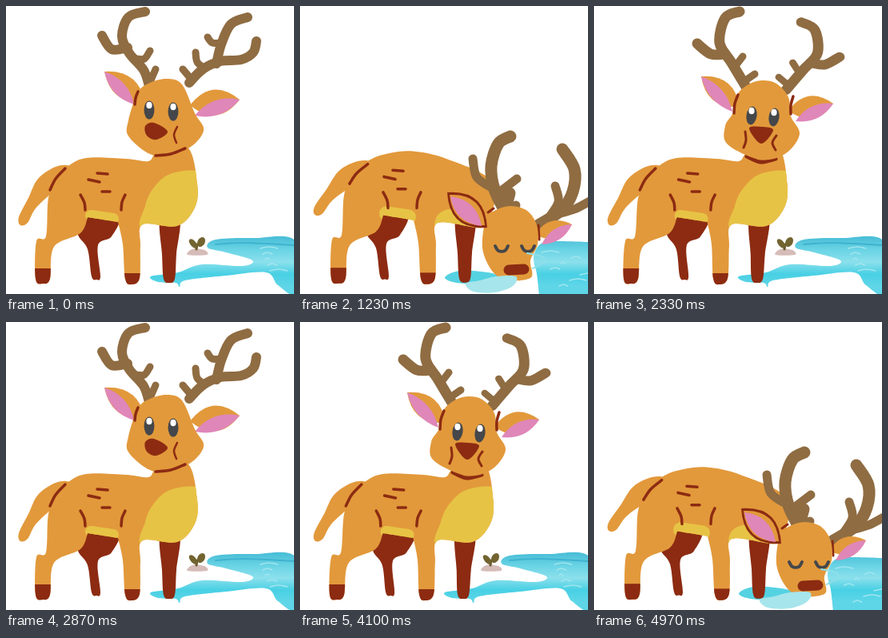
Write an HTML page with a canvas that moves like this. It is 360 px wide and 360 px high and loops after 5070 ms.

```html
<!DOCTYPE html>
<html lang="en">
<head>
<meta charset="utf-8">
<title>Drinking deer</title>
<style>
html, body { margin: 0; width: 100%; height: 100%; overflow: hidden; background: #fff; }
canvas { display: block; width: 360px; height: 360px; }
</style>
</head>
<body>
<canvas id="stage" width="360" height="360"></canvas>
<script>
const ctx = document.getElementById('stage').getContext('2d');
const COAT = '#e2993b', DARK = '#8c2b12', YELLOW = '#e7c345', PINK = '#df87b9',
      HORN = '#8f6c42', EYE = '#45474a';

// Smooth curve through "x,y x,y ..." points; a doubled point makes a corner.
function curve(text, open) {
  const pts = text.split(' ').map(p => p.split(',').map(Number)), n = pts.length;
  const at = i => open ? pts[Math.max(0, Math.min(n - 1, i))] : pts[(i + n) % n];
  const path = new Path2D();
  path.moveTo(...pts[0]);
  for (let i = 0; i < (open ? n - 1 : n); i++) {
    const [a, b, c, d] = [at(i - 1), at(i), at(i + 1), at(i + 2)];
    path.bezierCurveTo(b[0] + (c[0] - a[0]) / 6, b[1] + (c[1] - a[1]) / 6,
      c[0] - (d[0] - b[0]) / 6, c[1] - (d[1] - b[1]) / 6, c[0], c[1]);
  }
  return path;
}
function fill(color, text) {
  ctx.fillStyle = color;
  ctx.fill(curve(text));
}
function line(color, width, ...texts) {
  ctx.strokeStyle = color;
  ctx.lineWidth = width;
  ctx.lineCap = ctx.lineJoin = 'round';
  for (const t of texts) ctx.stroke(curve(t, true));
}
function oval(color, x, y, rx, ry, turn = 0) {
  ctx.fillStyle = color;
  ctx.beginPath();
  ctx.ellipse(x, y, rx, ry, turn, 0, 7);
  ctx.fill();
}
// Pointed leaf between two ends, w wide on each side.
function leaf(color, x0, y0, x1, y1, w) {
  const len = Math.hypot(x1 - x0, y1 - y0);
  const nx = (y0 - y1) / len * 2 * w, ny = (x1 - x0) / len * 2 * w;
  const mx = (x0 + x1) / 2, my = (y0 + y1) / 2;
  ctx.fillStyle = color;
  ctx.beginPath();
  ctx.moveTo(x0, y0);
  ctx.quadraticCurveTo(mx + nx, my + ny, x1, y1);
  ctx.quadraticCurveTo(mx - nx, my - ny, x0, y0);
  ctx.fill();
}
function moved(dx, dy, draw, turn = 0, sx = 1, sy = 1) {
  ctx.save();
  ctx.translate(dx, dy);
  ctx.rotate(turn);
  ctx.scale(sx, sy);
  draw();
  ctx.restore();
}

// --- water ---
function washed(text) {
  const g = ctx.createLinearGradient(0, 290, 0, 350);
  ['#4bbfd8', '#6ad4e5', '#8ce0ec', '#48d0e4', '#5fd6e7'].forEach((c, i) => g.addColorStop(i / 4, c));
  fill(g, text);
}
function ripples(x, y, count) {
  for (let i = 0; i < count; i++) {
    const w = 14 + 9 * Math.sin(i * 5 + 1), left = x + i * 37 % (352 - x), top = y + i * 7;
    line('#a2e6ef', 1.5, `${left},${top} ${left + w / 2},${top - 2} ${left + w},${top}`);
  }
}
const water = {
  wide() {
    washed('252,302 262,292 310,290 362,294 362,358 340,349 325,333 275,337 224,343 217,351 212,346 190,345 181,338 215,333 245,323 295,325 308,318 275,308');
    line('#3fb3cf', 2, '262,298 300,296 360,299');
    ripples(318, 303, 5);
  },
  thin() {
    washed('285,292 320,290 362,293 362,312 320,306 288,311');
    fill('#43d0e4', '181,338 215,333 245,326 290,328 312,319 306,329 260,339 215,344');
    line('#43c9dd', 2, '182,339 192,346 211,349');
  },
  full() {
    washed('292,315 300,298 320,294 362,295 362,295 364,364 364,364 299,362 299,362 296,335');
    fill('#55d2e2', '181,340 200,331 240,334 265,345 205,347');
    ripples(302, 308, 7);
  }
};
function splash(k) {
  fill('#a6e5eb', `${205 + k},347 225,343 245,338 270,338 266,350 244,358 217,357`);
  line('#8fdfe9', 2, '284,309 302,313 305,320 291,328');
}
function plant() {
  fill('#d6bcb8', '227,311 233,304 248,305 251,311');
  line('#6b5a2c', 3, '238,304 239,298');
  oval('#726430', 234, 297, 3.6, 7, -.7);
  oval('#726430', 244, 295, 4.5, 6.5, .5);
}

// --- body: bend 0 stands, bend 1 reaches down; lean shears it forward ---
const FRONT = [
  '75,202 100,190 150,191 178,194 189,184 227,177 239,222 236,252 214,275',
  '86,196 111,188 141,186 181,195 238,222 238,262 226,279'
];
const CHEST = [
  '240,207 205,210 184,228 174,250 171,280 236,280 246,230',
  '170,264 191,256 228,264 228,284 172,284'
];
const LEGS = ' 171,273 168,300 167,340 157,348 149,341 146,298 140,270 140,270 102,264 102,264 ' +
  '93,284 60,301 55,341 46,347 37,341 38,294 50,288 53,240 64,214';

function tail() {
  fill(COAT, '10,-7 -8,-7 -30,8 -42,32 -54,56 -52,66 -43,63 -33,45 -12,25 2,14');
  line(DARK, 3.5, '4,-5 -8,8 -15,22');
}
function body(bend, lean) {
  ctx.save();
  ctx.transform(1, 0, -lean / 100, 1, 3.47 * lean + 4 * bend, 0);
  moved(-9 * bend, 0, () =>
    fill(DARK, '88,262 90,286 102,304 107,338 113,342 118,338 115,299 132,288 140,262'));
  fill(DARK, '193,265 195,310 197,341 204,346 211,341 213,310 217,265');
  const coat = FRONT[bend] + LEGS;
  fill(COAT, coat);
  ctx.save();
  ctx.clip(curve(coat));
  fill(YELLOW, CHEST[bend]);
  line(YELLOW, 14 + 4 * bend, '106,262 134,266');
  ctx.fillStyle = DARK;
  ctx.fillRect(30, 328, 30, 30);
  ctx.fillRect(140, 334, 40, 30);
  ctx.restore();
  moved(70 + 8 * bend, 208 - 2 * bend, tail, .15 * bend);
  const hip = 9 * bend;
  line(DARK, 3.5, `${93 + hip},236 ${98 + hip},246 ${99 + hip},255`, '149,236 145,245 144,255',
    '114,209 127,210', '103,217 117,220', '120,232 130,232');
  ctx.restore();
}

// --- heads ---
function antler() {
  line(HORN, 13, '0,0 -18,-30 -33,-55 -26,-86 -8,-94', '-26,-41 -44,-41 -61,-54');
  line(HORN, 9, '-14,-25 -4,-38', '-2,-7 11,-16');
}
function ear(x, y, coat, pink) {
  leaf(COAT, x, y, ...coat);
  leaf(PINK, x, y, ...pink);
}
function eye(x, y, turn) {
  oval(EYE, x, y, 6.5, 11.5, turn);
  oval('#fff', x, y - 6, 3.6, 4.3);
}
function headSide(chew) {
  line(HORN, 12, '179,100 172,80 154,59 145,38 153,14 174,7', '152,52 132,54 120,37',
    '229,96 246,79 268,69 294,67 309,58 313,44', '263,72 269,48 281,23 302,14');
  line(HORN, 9, '163,66 173,66 180,56', '180,95 187,79', '269,46 258,46 252,39',
    '248,78 239,70 237,58', '232,92 221,79');
  ear(123, 82, [174, 121, 14], [160, 123, 8]);
  ear(292, 117, [230, 124, 16], [236, 137, 9]);
  fill(COAT, `165,108 180,96 201,91 220,98 236,134 ${247 + chew},156 226,179 186,187 154,164 153,143`);
  line(DARK, 3.5, '165,107 162,115 161,123', '187,187 206,185 224,178');
  eye(179, 130, 0);
  eye(209, 132, 0);
  fill(DARK, '174,150 185,146 202,157 188,167 176,162');
  line(DARK, 2.5, `${214 + chew},151 ${210 + chew},161 ${213 + chew},171`);
}
function headFront() {
  moved(190, 101, antler);
  moved(240, 105, antler, .13, -1, .92);
  ear(134, 88, [182, 126, 14], [173, 132, 8]);
  ear(299, 122, [243, 131, 14], [252, 144, 8]);
  line(DARK, 5, '191,188 208,195 227,191');
  fill(COAT, '179,111 193,98 210,93 228,97 243,114 246,138 257,160 240,184 208,192 167,173 164,150 174,133');
  line(DARK, 3.5, '180,111 176,122 175,134', '249,113 246,124 246,135');
  eye(197, 137, .15);
  eye(225, 139, .15);
  fill(DARK, '194,153 209,151 224,155 209,172');
  line(DARK, 3, '189,157 190,168 187,177', '228,162 223,171 227,180');
}
function lowAntlers() {
  line(HORN, 15, '258,214 245,187 241,158 250,130 265,121', '258,214 264,192',
    '300,232 329,213 343,190 345,162 330,137');
  line(HORN, 11, '243,186 223,172 218,149', '252,190 273,174', '262,213 272,207',
    '312,224 325,203 321,183', '324,218 345,212 364,202');
}
function headLow() {
  lowAntlers();
  ear(344, 225, [298, 244, 9], [303, 251, 6]);
  fill(COAT, '236,232 250,214 278,211 296,224 298,247 290,270 291,297 274,312 243,298 227,260');
  ear(191, 196, [240, 228, 15], [225, 240, 10]);
  line(DARK, 3, '192,197 196,219 224,240', '236,241 228,255 231,274', '298,236 303,251');
  for (const x of [252, 281]) {
    const y = 235 + x / 10;
    oval(EYE, x, y, 7.5, 5.5, .15);
    oval('#fff', x + 1.5, y - 2, 4.2, 3.5);
  }
  oval(DARK, 274, 290, 14, 9);
}
function headDrinking() {
  moved(-2, 42, lowAntlers);
  ear(340, 273, [294, 286, 11], [302, 298, 7]);
  line(DARK, 3, '298,274 299,292');
  fill(COAT, '232,268 245,255 264,250 284,256 296,274 297,298 288,318 288,340 250,340 229,308');
  leaf(DARK, 184, 233, 234, 277, 17);
  leaf(COAT, 187, 236, 231, 274, 14);
  leaf(PINK, 188, 238, 227, 275, 10);
  line(DARK, 3, '235,258 242,253');
  for (const x of [244, 277]) line(EYE, 4, `${x},300 ${x + 4},306 ${x + 12},306 ${x + 16},300`);
  line(DARK, 13, '261,330 280,329');
}

// --- poses ---
function raised(lean, head) {
  water.wide();
  plant();
  body(0, lean);
  head();
}
function lowered(pool, head) {
  water[pool]();
  plant();
  body(1, 0);
  head();
}
const pose = {
  S: k => raised(0, () => headSide(k % 2 * 2)),
  F: () => raised(2, headFront),
  D: () => raised(3, () => moved(2, 6, headFront)),
  L: () => raised(4, () => moved(5, 14, headFront)),
  H: () => lowered('wide', () => {
    fill(COAT, '170,193 195,184 217,160 250,168 258,220 228,276 190,262');
    moved(-16, -70, headLow);
  }),
  B: () => lowered('thin', headLow),
  b: () => lowered('wide', headLow),
  N: () => lowered('wide', () => moved(0, -25, headDrinking)),
  C(k) {
    water.full();
    moved(-2, -9, () => body(1, 0), 0, 1, 1.025);
    headDrinking();
    splash(k % 2 * 2);
  }
};

// One letter per 110 ms drawing, shown on 30 fps ticks.
const LOOP = 5070;
const order = 'SFDLHHBN' + 'C'.repeat(8) + 'NbHLDF' + 'S'.repeat(15) + 'FDLHHBNCC';

let shown;
function frame() {
  const tick = Math.floor(performance.now() % LOOP * .03 + .2);
  const k = Math.min(order.length - 1, Math.floor(tick * 10 / 33));
  if (k !== shown) {
    shown = k;
    ctx.clearRect(0, 0, 360, 360);
    pose[order[k]](k);
  }
  requestAnimationFrame(frame);
}
frame();
</script>
</body>
</html>
```
